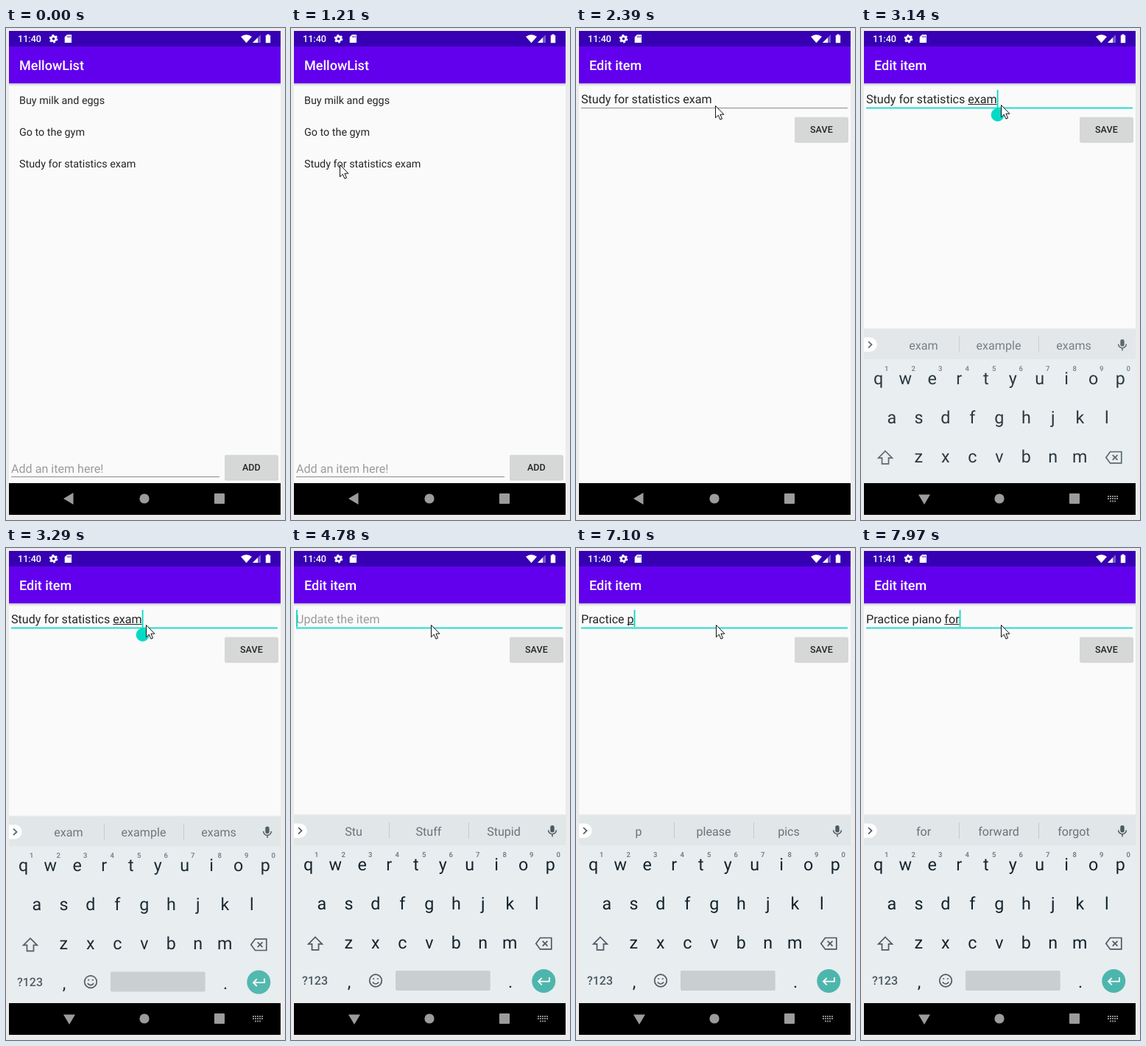
Recreate the animation shown at these times as an HTML page. Size 379 px wide and 667 px high, loop 8000 ms.

```html
<!DOCTYPE html>
<html lang="en">
<head>
<meta charset="utf-8">
<title>Todo list</title>
<style>
html, body { margin: 0; width: 100%; height: 100%; overflow: hidden; background: #ebebeb; }
svg { display: block; }
text { font-family: Roboto, "Open Sans", sans-serif; text-rendering: geometricPrecision; fill: #252525; }
.mid { text-anchor: middle; }
.title { font-size: 18px; font-weight: 500; fill: #fff; }
.item { font-size: 14.35px; }
.edit { font-size: 16.1px; }
.hint { fill: #9b9b9b; }
.btn { font-size: 12.57px; font-weight: 500; }
.word { font-size: 16.1px; fill: #68737a; }
.key { font-size: 23.3px; fill: #14242c; }
.digit { font-size: 9.5px; font-weight: 500; fill: #68737a; }
.line { fill: none; stroke: #4c5a61; stroke-width: 1.7; }
</style>
</head>
<body>
<svg width="379" height="667" viewBox="0 0 379 667">
  <defs>
    <clipPath id="stage"><rect x="4" y="4" width="369" height="656"/></clipPath>
    <clipPath id="reveal"><rect x="4" y="130" width="369" height="530"/></clipPath>
    <clipPath id="above-nav"><rect x="4" y="75" width="369" height="542"/></clipPath>
    <linearGradient id="fade" x2="0" y2="1">
      <stop stop-opacity=".2"/><stop offset="1" stop-opacity="0"/>
    </linearGradient>
    <g id="page">
      <rect x="4" y="4" width="369" height="613" fill="#fafafa"/>
      <rect x="4" y="4" width="369" height="21" fill="#3700b3"/>
      <rect x="4" y="25" width="369" height="50" fill="#6200ee"/>
      <rect x="4" y="75" width="369" height="4" fill="url(#fade)"/>
    </g>
    <g id="button">
      <rect x="297" y="1.2" width="73" height="33.6" rx="2" fill="#000" opacity=".16"/>
      <rect x="297" width="72.6" height="33.3" rx="2" fill="#d6d7d7"/>
    </g>
  </defs>
  <rect width="379" height="667" fill="#ebebeb"/>
  <g clip-path="url(#stage)">
    <g fill="#9c9c9c">
      <rect x="4" y="616.5" width="369" height="44" fill="#000"/>
      <path id="back" d="M78 638l13.5-8v16z"/>
      <circle cx="188" cy="638" r="6.6"/>
      <rect x="283" y="631" width="14" height="14" rx="1"/>
      <path id="switcher" d="M335 635h14M335 638h14M338 641.5h8" stroke="#8c8c8c" stroke-width="1.8" stroke-dasharray="2 1"/>
    </g>

    <g id="list">
      <use href="#page"/>
      <text class="title" x="18" y="57.3">MellowList</text>
      <text class="item" x="18" y="102.5">Buy milk and eggs</text>
      <text class="item" x="18" y="145.6">Go to the gym</text>
      <text class="item" x="18" y="188.6">Study for statistics exam</text>
      <text class="edit hint" x="7" y="602.5">Add an item here!</text>
      <rect x="7" y="608" width="283" height="1" fill="#8c8c8c"/>
      <use href="#button" y="578.7"/>
      <text class="btn mid" x="333.4" y="600">ADD</text>
      <rect id="shade" x="4" y="4" width="369" height="613" opacity=".1"/>
    </g>

    <g id="reveal-box"><g id="editor">
      <use href="#page"/>
      <text class="title" x="18" y="57.3">Edit item</text>
      <rect id="rule" x="7" width="362"/>
      <text class="edit hint" id="hint" x="7" y="101.8">Update the item</text>
      <text class="edit" id="field" x="7" y="101.8" xml:space="preserve"></text>
      <rect id="underline" y="103" height="1" fill="#252525"/>
      <use href="#button" y="120.8"/>
      <text class="btn mid" x="333.4" y="142.2">SAVE</text>
      <rect id="caret" y="84" width="1.8" height="23" fill="#03dac5"/>
      <path id="handle" d="M0 107L6.4 111.4A9 9 0 1 1-6.4 111.4Z" fill="#03dac5"/>
    </g></g>

    <g clip-path="url(#above-nav)"><g id="keyboard">
      <rect x="4" y="361" width="369" height="2" fill="#000" opacity=".06"/>
      <rect x="4" y="362.5" width="369" height="255" fill="#e8edf0"/>
      <rect x="4" y="362.5" width="369" height="40.5" fill="#e1e6e8"/>
      <path d="M133.5 372v22M241.5 372v22" stroke="#c5cbce"/>
      <path d="M4 373.5h8a9.7 9.7 0 0 1 0 19.4h-8z" fill="#fff"/>
      <path class="line" d="M10 379l4.5 4.3-4.5 4.3"/>
      <rect x="352.3" y="376" width="5.4" height="9.6" rx="2.7" fill="#4c5a61"/>
      <path class="line" d="M349.6 382.5a5.4 5.4 0 0 0 10.8 0M355 388v3.4" style="stroke-width:1.5"/>
      <g id="words"></g>
      <g id="keys"></g>
      <path class="line" d="M33 527.5l9.3 9.3h-4.8v8h-9v-8h-4.8z"/>
      <path class="line" d="M338.5 528.5h15.3v15.4h-15.3l-5.7-7.7zM341.7 532.8l6.8 6.8M348.5 532.8l-6.8 6.8"/>
      <text class="mid" x="32.5" y="592.3" style="font-size:16px;fill:#4c5a61;font-weight:500">?123</text>
      <circle class="line" cx="115" cy="586.5" r="8.3"/>
      <path class="line" d="M110.8 588.5q4.2 5 8.4 0M111.2 584h2M116.8 584h2"/>
      <rect x="142" y="573" width="128.7" height="27" rx="2" fill="#c9ced1"/>
      <circle cx="343.3" cy="587" r="16" fill="#4db6ac"/>
      <path d="M351 582v5.6h-15m4.8-4.8l-4.8 4.8 4.8 4.8" fill="none" stroke="#fff" stroke-width="1.8"/>
    </g></g>

    <g fill="#fff">
      <text id="clock" x="16" y="19.4" style="font-size:12.6px;font-weight:500;fill:#fff"></text>
      <circle cx="64.5" cy="14.6" r="3.2" fill="none" stroke="#fff" stroke-width="2.7"/>
      <circle cx="64.5" cy="14.6" r="4.9" fill="none" stroke="#fff" stroke-width="2" stroke-dasharray="2.6 2.53"/>
      <path d="M83 9h6v11h-9.3v-7.7z"/>
      <path d="M83.7 10.5v2.5M85.6 10.5v2.5M87.5 10.5v2.5" stroke="#3700b3" stroke-width=".8"/>
      <path d="M319 11.8q7.5-5.6 15 0l-7.5 8.4z"/>
      <path d="M335 20l11-11v11z" opacity=".35"/>
      <path d="M335 20l7-7v7z"/>
      <path d="M354.5 8.5h3v1.3h1.7v10.4h-6.4v-10.4h1.7z"/>
    </g>
    <path id="mouse" d="M.5.5v16.3l3.8-3.6 2.6 6 2.6-1.1-2.6-5.9h5z" fill="#fff" stroke="#111"/>
  </g>
</svg>
<script>
const LOOP = 8000, OPEN = 1830, OPENED = 1980, FOCUS = 2840, TYPE = 4050;
const $ = id => document.getElementById(id);
const at = (steps, t) => steps.findLast(s => s[0] <= t);
const show = (id, on) => $(id).setAttribute('visibility', on ? 'visible' : 'hidden');
const set = (id, attrs) => { for (const k in attrs) $(id).setAttribute(k, attrs[k]); };

const label = (parent, cls, x, y, s) => {
  const el = document.createElementNS('http://www.w3.org/2000/svg', 'text');
  el.setAttribute('class', cls + ' mid');
  el.setAttribute('x', x);
  el.setAttribute('y', y);
  el.textContent = s;
  return $(parent).appendChild(el);
};

[['qwertyuiop', 23.7], ['asdfghjkl', 41.9], ['zxcvbnm', 78.3]].forEach(([row, x], r) =>
  [...row].forEach((c, i) => {
    label('keys', 'key', x + i * 36.5, 436.7 + r * 53, c);
    if (!r) label('keys', 'digit', x + 11 + i * 36.5, 418.6, (i + 1) % 10);
  }));
label('keys', 'key', 79, 596, ',');
label('keys', 'key', 298, 596, '.');
const words = [85, 187, 289].map(x => label('words', 'word', x, 389.5, ''));

// time, text, suggestions; * marks the bold one
const typing = [
  [0, 'Study for statistics exam', 'exam|example|exams'],
  [4050, 'Study for statistics exa', 'exa|exam|example'],
  [4200, 'Study for statistic', 'statistic|statistics|static'],
  [4350, 'Study for sta', 'sta|start|stay'],
  [4490, 'Study fo', 'fo|for|four'],
  [4640, 'Stu', 'Stu|Stuff|Stupid'],
  [4780, '', 'Stu|Stuff|Stupid'],
  [4930, '', "I|The|I'm"],
  [5830, 'P', 'P|Please|Pay'],
  [5970, 'Pr', 'Pr|Pretty|Pray'],
  [6100, 'Pra', 'Pra|Practice|Pray'],
  [6370, 'Prac', 'Prac|*Practice|Practicing'],
  [6520, 'Pract', 'Pract|*Practice|Practicing'],
  [6660, 'Practic', 'Practic|*Practice|Practicing'],
  [6810, 'Practice', 'Practice|Practices|Practiced'],
  [6960, 'Practice ', 'and|is|for'],
  [7100, 'Practice p', 'p|please|pics'],
  [7250, 'Practice pi', 'pi|pics|pizza'],
  [7400, 'Practice pian', 'pian|*piano|pianos'],
  [7520, 'Practice piano', 'piano|pianos|pianist'],
  [7670, 'Practice piano ', 'and|is|for'],
  [7820, 'Practice piano f', 'f|for|from'],
  [7970, 'Practice piano for', 'for|forward|forgot']
];

const mousePath = [
  [0, -50, -50], [550, 137, 338], [680, 126, 292], [815, 105, 235], [945, 84, 190], [1080, 70, 167],
  [1210, 66, 185], [2120, 96, 166], [2250, 152, 128], [2390, 189, 105], [2840, 190, 104]
];
const caretOn = [[0, 0], [FOCUS, 1], [3440, 0], [3740, 1], [5390, 0], [5830, 1]];
const keyboardDrop = [[0, 256, 0], [3140, 46, .9], [3290, 1.6, .96], [3440, 0, 1]];

const field = $('field');
const width = s => {
  field.textContent = s;
  return s ? field.getComputedTextLength() : 0;
};

let shown;
function drawTyping(step) {
  if (step === shown) return;
  shown = step;
  const [, text, suggestions] = step;
  const start = width(text.slice(0, text.lastIndexOf(' ') + 1)), end = width(text);
  set('underline', { x: 7 + start, width: end - start });
  set('caret', { x: 7 + end });
  set('handle', { transform: `translate(${7.9 + end})` });
  show('hint', !text);
  suggestions.split('|').forEach((s, i) => {
    const bold = s[0] === '*';
    words[i].textContent = s.replace('*', '');
    words[i].style.cssText = bold ? 'font-weight:700;fill:#000' : '';
  });
}

function draw(t) {
  const opening = t >= OPEN && t < OPENED, focused = t >= FOCUS;
  const [, drop, alpha] = at(keyboardDrop, t);
  const [, x, y] = at(mousePath, t);

  set('list', { transform: `translate(0 ${opening ? -4 : 0})` });
  show('shade', opening);
  set('reveal-box', {
    display: t < OPEN ? 'none' : 'inline',
    'clip-path': opening ? 'url(#reveal)' : 'none'
  });
  set('editor', { transform: `translate(0 ${opening ? 18 : 0})` });

  drawTyping(at(typing, t));
  set('rule', focused
    ? { y: 107.6, height: 1.7, fill: '#03dac5' }
    : { y: 108, height: 1, fill: '#8c8c8c' });
  show('underline', focused);
  show('caret', at(caretOn, t)[1]);
  show('handle', focused && t < TYPE);

  set('keyboard', { transform: `translate(0 ${drop})`, opacity: alpha });
  set('back', { transform: alpha ? 'rotate(-90 86 638)' : '' });
  show('switcher', alpha);
  $('clock').textContent = t < 7670 ? '11:40' : '11:41';
  set('mouse', { transform: `translate(${x} ${y})` });
}

const begin = performance.now();
function tick() {
  draw((performance.now() - begin) % LOOP);
  requestAnimationFrame(tick);
}
tick();
</script>
</body>
</html>
```
